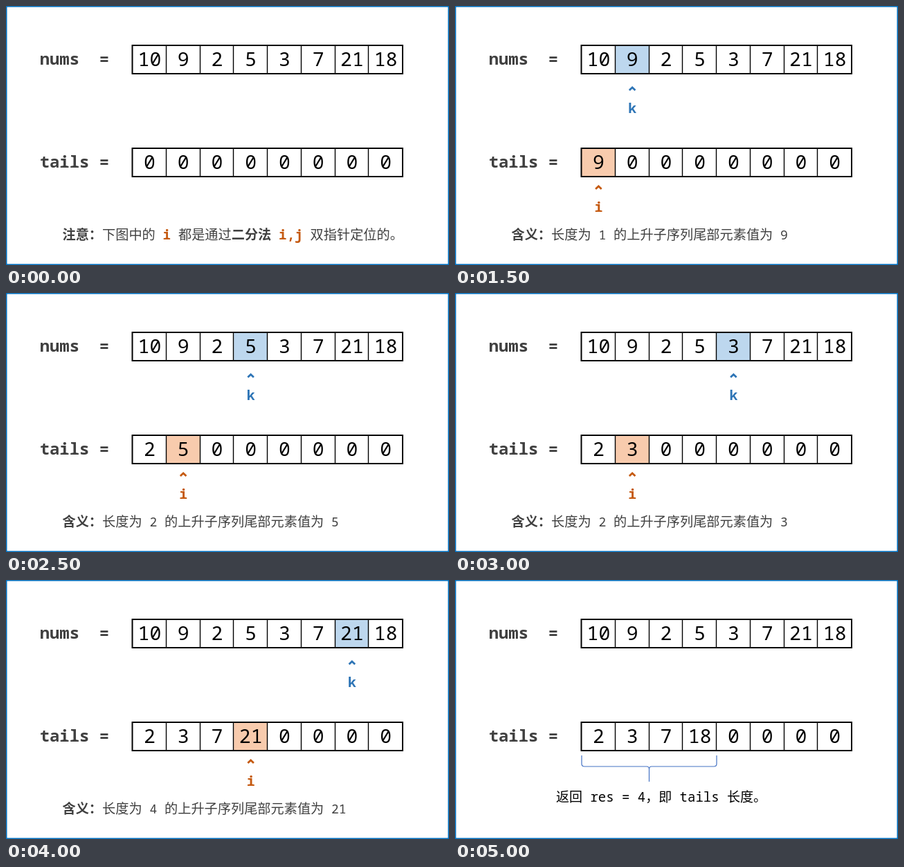
Write an HTML page with a canvas that moves like this. It is 640x375 px and loops after 6500 ms.

```html
<!DOCTYPE html>
<html lang="zh-CN">
<head>
<meta charset="utf-8">
<style>
html, body { margin: 0; width: 640px; height: 375px; overflow: hidden; background: #fff; }
canvas { display: block; }
</style>
</head>
<body>
<canvas width="640" height="375"></canvas>
<script>
const ctx = document.querySelector('canvas').getContext('2d');
const MONO = '"Noto Sans Mono", monospace';
const CJK = '"Noto Sans CJK SC", "Noto Sans CJK", sans-serif';
const DARK = '#404040', BLUE = '#2e75b6', ORANGE = '#c55a11';
const LEFT = 183, CELL = 48.75, HEIGHT = 41;
const nums = [10, 9, 2, 5, 3, 7, 21, 18];

function text(str, x, y, size, color, { weight = 400, family = MONO, align = 'left' } = {}) {
  ctx.font = `${weight} ${size}px ${family}`;
  ctx.fillStyle = color;
  ctx.textAlign = align;
  ctx.fillText(str, x, y);
  return x + ctx.measureText(str).width;
}

function path(d, color, width) {
  ctx.strokeStyle = color;
  ctx.lineWidth = width;
  ctx.stroke(new Path2D(d));
}

const cellX = n => LEFT + n * CELL;

function row(label, values, y, active, fill) {
  text(label, 48.7, y + 27.5, 23.9, DARK, { weight: 800 });
  if (active >= 0) {
    ctx.fillStyle = fill;
    ctx.fillRect(cellX(active), y, CELL, HEIGHT);
  }
  values.forEach((v, n) => text(v, cellX(n + 0.5), y + 30, 28, '#000', { align: 'center' }));
  for (let n = 1; n < 8; n++) path(`M${Math.round(cellX(n)) - 0.5} ${y}v${HEIGHT}`, '#000', 1.4);
  path(`M${LEFT - 0.5} ${y}H573V${y + HEIGHT}H${LEFT - 0.5}Z`, '#000', 2);
}

function pointer(name, n, y, color) {
  const x = cellX(n + 0.5);
  path(`M${x - 4.3} ${y + 5}L${x} ${y + 1}L${x + 4.3} ${y + 5}`, color, 2.8);
  text(name, x, y + 38, 20, color, { weight: 800, align: 'center' });
}

// Each run is [string, weight, color, mono size]; the script picks its font.
function caption(runs, x, y, cjkSize, monoSize) {
  for (const [str, weight = 400, color = DARK, size = monoSize] of runs) {
    const latin = /^[\x20-\x7e]+$/.test(str);
    x = text(str, x, y, latin ? size : cjkSize, color, { weight, family: latin ? MONO : CJK });
  }
}

function note(...runs) { caption(runs, 81.5, 338, 19.2, 18); }

function search(count) {
  const tails = Array(8).fill(0);
  let size = 0, i = -1;
  for (const v of nums.slice(0, count)) {
    i = 0;
    let j = size;
    while (i < j) {
      const m = (i + j) >> 1;
      if (tails[m] < v) i = m + 1; else j = m;
    }
    tails[i] = v;
    if (i === size) size++;
  }
  return { tails, i };
}

function draw(ms) {
  const k = Math.floor((ms - 1000) / 500);
  const started = k >= 0, done = k >= 8, running = started && !done;
  const { tails, i } = search(started ? k + 1 : 0);

  ctx.fillStyle = '#fff';
  ctx.fillRect(0, 0, 640, 375);
  path('M.75 .75H639.25V374.25H.75Z', '#0070c0', 1.5);
  row('nums  =', nums, 57, running ? k : -1, '#bdd7ee');
  row('tails =', tails, 206, running ? i : -1, '#f8cbad');

  if (running) {
    pointer('k', k, 117, BLUE);
    pointer('i', i, 260, ORANGE);
    note(['含义：', 700], ['长度为'], [` ${i + 1} `], ['的上升子序列尾部元素值为'], [` ${nums[k]}`]);
  } else if (done) {
    path('M183 254V266Q183 270 187 270H277Q280.5 270 280.5 274V292' +
         'M280.5 274Q280.5 270 284 270H374Q378 270 378 266V254', '#4472c4', 1.2);
    caption([['返回'], [' res = 4'], ['，即'], [' tails '], ['长度。']]
      .map(([s]) => [s, 400, '#000']), 146, 321, 19, 19);
  } else {
    const code = str => [str, 800, ORANGE, 19.3];
    note(['注意：', 700], ['下图中的'], [' '], code('i'), [' '], ['都是通过'], ['二分法', 700],
      [' '], code('i,j'), [' '], ['双指针定位的。']);
  }
}

const start = performance.now();
function frame() {
  draw((performance.now() - start) % 6500);
  requestAnimationFrame(frame);
}
frame();
</script>
</body>
</html>
```
